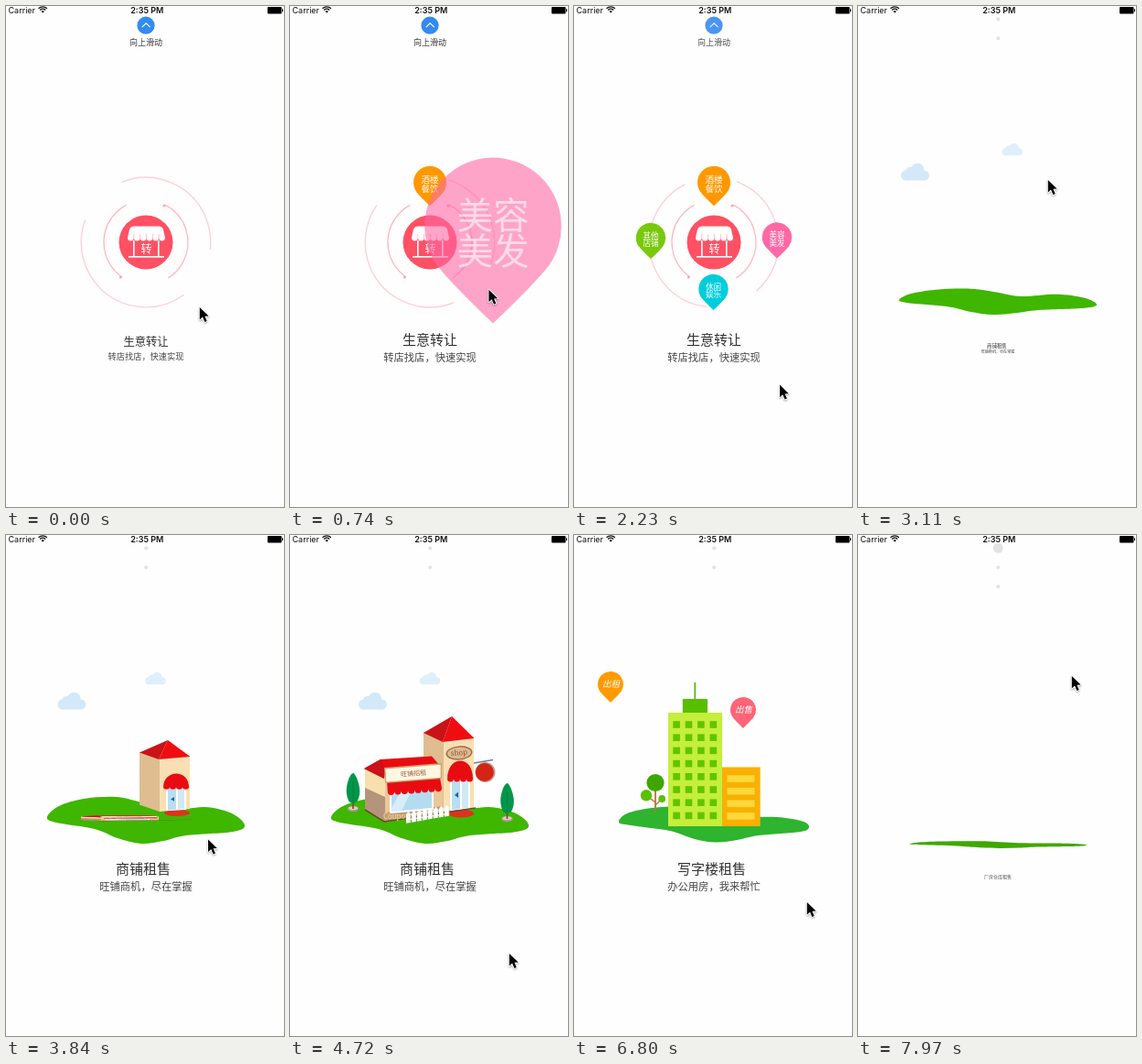
An HTML page with a canvas for the animation above (8 s loop, 304 by 547 pixels).

```html
<!DOCTYPE html>
<html lang="zh">
<head>
<meta charset="utf-8">
<title>Shop onboarding</title>
<style>
html, body { margin: 0; width: 100%; height: 100%; overflow: hidden; background: #fefefe; }
canvas { display: block; width: 304px; height: 547px; }
</style>
</head>
<body>
<canvas id="stage"></canvas>
<script>
const W = 304, H = 547, LOOP = 8000, STEP = 147.6;
const CJK = '"Noto Sans CJK SC", "Noto Sans CJK", sans-serif';
const cv = document.getElementById('stage');
const c = cv.getContext('2d');
const dpr = window.devicePixelRatio || 1;
cv.width = W * dpr;
cv.height = H * dpr;

const clamp = v => Math.max(0, Math.min(1, v));
const ramp = (n, start, len) => clamp((n - start) / len);
const backOut = p => 1 + 2.2 * (p - 1) ** 3 + 1.2 * (p - 1) ** 2;
const rad = d => d * Math.PI / 180;

function poly(color, ...p) {
  c.beginPath();
  for (let i = 0; i < p.length; i += 2) c.lineTo(p[i], p[i + 1]);
  c.closePath();
  c.fillStyle = color;
  c.fill();
}
function line(color, width, ...p) {
  c.beginPath();
  for (let i = 0; i < p.length; i += 2) c.lineTo(p[i], p[i + 1]);
  c.strokeStyle = color;
  c.lineWidth = width;
  c.stroke();
}
function oval(color, x, y, rx, ry = rx) {
  c.beginPath();
  c.ellipse(x, y, rx, ry, 0, 0, 7);
  c.fillStyle = color;
  c.fill();
}
function rect(color, x, y, w, h) {
  c.fillStyle = color;
  c.fillRect(x, y, w, h);
}
function arc(color, width, r, from, to) {
  c.beginPath();
  c.arc(153, 258, r, rad(from), rad(to));
  c.strokeStyle = color;
  c.lineWidth = width;
  c.stroke();
}
function text(str, x, y, size, color, weight = 400, font = CJK, align = 'center') {
  c.font = `${weight} ${size}px ${font}`;
  c.textAlign = align;
  c.textBaseline = 'alphabetic';
  c.fillStyle = color;
  c.fillText(str, x, y + size * 0.36);
}
// Closed smooth curve through the given points
function blob(color, p) {
  const k = p.length, at = i => p[(i + k) % k];
  c.beginPath();
  c.moveTo(...p[0]);
  for (let i = 0; i < k; i++) {
    const [a, b, d, e] = [at(i - 1), at(i), at(i + 1), at(i + 2)];
    c.bezierCurveTo(b[0] + (d[0] - a[0]) / 6, b[1] + (d[1] - a[1]) / 6,
      d[0] - (e[0] - b[0]) / 6, d[1] - (e[1] - b[1]) / 6, d[0], d[1]);
  }
  c.fillStyle = color;
  c.fill();
}
function scaled(x, y, sx, sy, draw) {
  if (sx <= 0 || sy <= 0) return;
  c.save();
  c.translate(x, y);
  c.scale(sx, sy);
  c.translate(-x, -y);
  draw();
  c.restore();
}
const grow = (n, start, len, x, y, draw) => {
  const s = backOut(ramp(n, start, len));
  if (n > start) scaled(x, y, s, s, draw);
};
const rise = (n, start, len, y, draw) => scaled(0, y, 1, ramp(n, start, len), draw);

function pin(x, y, r, color) {
  c.beginPath();
  c.arc(x, y, r, rad(145), rad(35));
  c.quadraticCurveTo(x + r * 0.6, y + r * 0.85, x, y + r * 1.42);
  c.quadraticCurveTo(x - r * 0.6, y + r * 0.85, x - r * 0.82, y + r * 0.57);
  c.fillStyle = color;
  c.fill();
}
function caption(s, title, sub, dx) {
  scaled(153, 374, s, s, () => {
    text(title, 153 + dx, 364.5, 15, '#333');
    text(sub, 153, 384, 11.25, '#444');
  });
}
const landScale = s => clamp(1 - Math.exp(-(s - 0.23) * 6.2));

const LAND_A = [[45, 308], [58, 296], [85, 288], [120, 286], [148, 292], [178, 301], [217, 297],
  [247, 304], [261, 317], [248, 324], [197, 328], [172, 334], [148, 337], [122, 331], [97, 321], [55, 314]];
const LAND_B = [[49, 313.5], [58, 304], [85, 298], [115, 296.5], [142, 297.5], [183, 307], [222, 308],
  [248, 312], [257, 318], [248, 324], [202, 328], [178, 333], [155, 335.5], [132, 332], [105, 323], [62, 317]];

// Category pins: x, y of the middle, final radius, moment of radius 106, colour, two lines
const PINS = [
  [153, 196.5, 18, 2.3, '#ff9800', '酒楼', '餐饮'],
  [222, 256, 16.2, 4.4, '#ff68a4', '美容', '美发'],
  [152.5, 312.5, 16.2, 6.56, '#00cddc', '休闲', '娱乐'],
  [84, 256.5, 16.2, 8, '#78c90c', '其他', '店铺']
];

function transferPage(n) {
  const turn = n * 2.85;
  arc('#ffd0d7', 1.4, 70.8, -112 + turn, 6.5 + turn);
  arc('#ffd0d7', 1.4, 70.8, 54 + turn, 200.5 + turn);
  arc('#ffb5c0', 1.2, 46, -63, 58);
  arc('#ffb5c0', 1.2, 46, 126, 242);
  oval('#ffa5b3', 173, 218, 1.6);
  oval('#ffa5b3', 125.5, 296, 1.6);

  oval('#ff5064', 153, 258, 29.5);
  c.beginPath();
  c.moveTo(140, 240.5);
  c.lineTo(167, 240.5);
  c.quadraticCurveTo(171, 240.5, 172, 244);
  c.lineTo(174, 253);
  for (let i = 0; i < 6; i++) c.arc(170.6 - i * 6.84, 253, 3.42, 0, Math.PI);
  c.lineTo(135, 244);
  c.quadraticCurveTo(136, 240.5, 140, 240.5);
  c.fillStyle = '#fff';
  c.fill();
  for (let i = 1; i < 6; i++) line('#ff9aa6', 0.6, 174 - i * 6.84, 249, 174 - i * 6.84, 256);
  rect('#fff', 139, 256, 1.6, 17.5);
  rect('#fff', 166, 256, 1.6, 17.5);
  rect('#fff', 134, 273, 39, 1.6);
  text('转', 153.5, 265.5, 12, '#fff', 500);

  caption(Math.min(1, 0.82 + n * 0.2), '生意转让', '转店找店，快速实现', 0);

  for (const [x, mid, end, at, color, a, b] of PINS) {
    const size = 106 - (n - at) * 52;
    if (size > 125) continue;
    const r = Math.max(end, size), y = mid - r * 0.21;
    c.save();
    c.globalAlpha *= clamp(1 - (r - 18) * 0.0072);
    pin(x, y, r, color);
    text(a, x, y - r * 0.15, r * 0.53, '#fff');
    text(b, x, y + r * 0.37, r * 0.53, '#fff');
    c.restore();
  }
}

function hint(n) {
  c.save();
  if (n > 11) c.globalAlpha *= 0.8 + 0.2 * Math.cos((n - 11) * 1.3);
  oval('#338af0', 153, 21.2, 9.6);
  line('#fff', 1.1, 148.7, 23.2, 153.2, 18.8, 157.7, 23.2);
  text('向上滑动', 153, 39.5, 9, '#333');
  c.restore();
}

function cloud(x, y, w, color) {
  scaled(x, y, w / 31, w / 31, () => {
    oval(color, x + 5.5, y + 13.5, 5.5);
    oval(color, x + 10, y + 9.5, 5.2);
    oval(color, x + 18, y + 7.5, 7.3);
    oval(color, x + 25.5, y + 13.5, 5.5);
    rect(color, x + 5.5, y + 9, 20, 10);
  });
}
function cypress(x, y) {
  oval('#a79482', x, y, 6.5, 3.2);
  oval('#d9cdbd', x, y - 0.8, 5, 2);
  rect('#7a4b28', x - 0.8, y - 12, 1.6, 12);
  blob('#00964a', [[x, y - 39], [x + 5, y - 31], [x + 7.3, y - 19], [x + 5, y - 9],
    [x, y - 6], [x - 5, y - 9], [x - 7.3, y - 20], [x - 5, y - 32]]);
  line('#087c40', 0.8, x, y - 30, x, y - 7);
}
function tower() {
  poly('#dfbd90', 146, 215, 168, 226, 168, 302, 146, 292);
  poly('#f8e0b2', 168, 226, 201, 222, 201, 298, 168, 302);
  poly('#c91318', 146, 216, 177, 198, 167, 226);
  poly('#f00d12', 177, 198, 201.5, 222, 167, 226);
  oval('#e03020', 187, 304, 14, 4.5);
  poly('#fff', 175, 267, 197, 266, 197, 299, 175, 301);
  poly('#b9def0', 177, 268, 186, 268, 186, 299, 177, 300);
  poly('#cfe9f5', 188, 268, 195, 268, 195, 298, 188, 299);
  poly('#1f6a94', 180, 284, 184, 280.5, 184, 287);
  c.beginPath();
  c.moveTo(172, 267);
  c.bezierCurveTo(172, 240, 200, 240, 200, 266);
  for (let i = 0; i < 4; i++) c.arc(196.5 - i * 7, 266, 3.5, 0, Math.PI);
  c.fillStyle = '#e90b12';
  c.fill();
}
function shopSigns() {
  c.save();
  c.translate(185, 238);
  c.rotate(-0.08);
  oval('#9c6c48', 0, 0, 14.5, 7.6);
  oval('#deb992', 0, 0, 13, 6.2);
  text('shop', 0, -0.5, 8, '#8a5838', 400, '"Noto Serif", serif');
  c.restore();
  line('#6d8494', 1.4, 201, 249, 222, 245.5);
  line('#6d8494', 0.8, 213, 247, 213, 251);
  oval('#b9a08c', 213.5, 259, 11);
  oval('#d42416', 212.8, 259, 10);
}
function store() {
  poly('#f8dfad', 82, 255, 104, 266, 104, 312, 82, 300);
  poly('#b4947a', 82, 276, 104, 286, 104, 312, 82, 300);
  poly('#e9c99a', 104, 262, 167, 256, 167, 303, 104, 312);
  poly('#c39c70', 104, 303, 167, 296, 167, 303, 104, 312);
  poly('#e90b12', 81, 255, 99, 245, 155, 241.5, 164, 252, 104, 258, 103, 266);
  poly('#c91318', 81, 255, 99, 245, 104, 258, 103, 266);
  poly('#fff', 109, 282, 157, 278, 157, 300, 109, 304);
  poly('#b3dcf1', 111, 283, 155, 279, 155, 298, 111, 302);
  poly('#d6eef9', 120, 282, 132, 281, 122, 301, 111, 302, 111, 298);
  line('#6b4a2c', 1.6, 82, 300, 103, 313, 203, 298);
  text('Coupon', 102, 307, 8, '#f6dda8', 400, '"Noto Serif", serif', 'left');
  c.beginPath();
  c.moveTo(106, 269);
  c.lineTo(164, 265);
  c.lineTo(166, 276);
  for (let i = 0; i < 8; i++) c.arc(162.3 - i * 7.4, 276.5 + i * 0.55, 3.7, 0, Math.PI);
  c.fillStyle = '#e90b12';
  c.fill();
  poly('#cfa26c', 103, 254, 166, 249, 166, 266, 104, 271);
  poly('#fff7e2', 104.5, 255.5, 164.7, 250.7, 164.7, 264.8, 105.3, 269.4);
  c.save();
  c.translate(135, 260.3);
  c.rotate(-0.07);
  text('旺铺招租', 0, 0, 7, '#94603c');
  c.restore();
}
function fence() {
  line('#eee', 1.6, 127, 306, 174, 299);
  line('#eee', 1.6, 127, 311, 174, 304);
  for (let i = 0; i < 8; i++) {
    const x = 127 + i * 6, y = 303 - i * 1.05;
    poly('#fff', x, y + 2, x + 2.4, y - 1, x + 4.8, y + 1.5, x + 4.8, y + 11, x, y + 11.8);
    line('#d5d5d5', 0.4, x + 5, y + 2, x + 5, y + 11);
  }
}
function shopPage(n) {
  const s = clamp((n - 19.2) / 5), drift = Math.max(0, n - 23);
  cloud(47 + drift * 3.1, 171.5, 31, '#d3e9fa');
  cloud(157.5 - drift * 1.75, 149.5, 22.5, '#dfeffc');
  scaled(0, 337, 1, landScale(s) / landScale(1), () => blob('#3fb600', LAND_A));
  rise(n, 24.2, 2.4, 302, tower);
  rise(n, 25.8, 2.4, 312, store);
  grow(n, 27.5, 2, 201, 248, shopSigns);
  grow(n, 28, 2, 69, 299, () => cypress(69, 299));
  grow(n, 28.6, 2, 237.5, 310, () => cypress(237.5, 310));
  rise(n, 29, 2, 314, fence);
  caption(s, '商铺租售', '旺铺商机，尽在掌握', -3);
}

function office() {
  rect('#58be00', 131.4, 161, 1.8, 19);
  rect('#58be00', 118.8, 179, 27.2, 16);
  rect('#c5ee3d', 103, 194, 59, 124);
  for (let row = 0; row < 8; row++)
    for (let col = 0; col < 4; col++)
      rect('#62c400', 108.3 + col * 13.4, 203.2 + row * 14.2, 7.6, 7.6);
}
function annex() {
  rect('#f9b000', 162, 253.5, 41.7, 64.5);
  for (let i = 0; i < 4; i++) rect('#ffd83b', 167.5, 262.3 + i * 13.6, 30, 7.6);
}
function roundTree() {
  line('#b5753c', 1.8, 89, 276, 89, 303);
  line('#b5753c', 1.5, 80, 285, 89, 292);
  line('#b5753c', 1.5, 96, 288, 89, 295);
  oval('#3fa600', 89, 270.5, 9.6);
  oval('#5ac000', 79, 284.3, 6.2);
  oval('#5ac000', 96.2, 288, 3.9);
}
function label(x, y, color, str) {
  pin(x, y, 14, color);
  text(str, x + 0.5, y, 9.5, '#fff', 'italic 400');
}
function officePage(n) {
  const s = clamp((n - 35.65) / 5);
  scaled(0, 336, 1, landScale(s) / landScale(1), () => blob('#2eb42e', LAND_B));
  rise(n, 40.1, 2.4, 318, office);
  rise(n, 41.4, 2, 318, annex);
  grow(n, 42.4, 2, 89, 303, roundTree);
  grow(n, 43, 2, 40, 183, () => label(40, 163, '#ff9a00', '出租'));
  grow(n, 43.8, 2, 185, 211, () => label(185, 191, '#ff6478', '出售'));
  caption(s, '写字楼租售', '办公用房，我来帮忙', -2.5);
}

function factoryPage(n) {
  const s = clamp((n - 52.7) / 5);
  scaled(153, 342, 0.93, landScale(s) * 1.15, () => {
    c.translate(0, 6);
    blob('#3fa800', LAND_B);
  });
  const k = s / 0.26;
  scaled(153, 373, k, k, () => text('厂房仓库租售', 153, 373, 5, '#555'));
}

// Page: painter, first step, start of exit, dots as [y, step at which it is small]
const PAGES = [
  [transferPage, -9, 17.6, []],
  [shopPage, 19.2, 33.4, [[14, 20], [35, 20.8]]],
  [officePage, 35.65, 49.6, [[14, 36.5], [35, 40]]],
  [factoryPage, 52.7, 99, [[14, 54.85], [35, 53.2], [56, 53.8]]]
];

function pages(n) {
  PAGES.forEach(([paint, from, exit, dots], i) => {
    const out = ramp(n, exit, 2);
    const shown = i ? PAGES[i - 1][2] : from;
    if (n >= shown && n < exit) {
      for (const [y, done] of dots) {
        const r = 2.1 + 4 * Math.max(0, done - n);
        if (r < 17) oval('#e3e3e3', 153.2, y + 0.3, r);
      }
    }
    if (n < from || out >= 1) return;
    c.save();
    c.globalAlpha = 1 - out;
    if (!i) hint(n);
    scaled(153, 270, 1 - out * 0.6, 1 - out * 0.6, () => paint(n));
    c.restore();
  });
}

function statusBar() {
  text('Carrier', 2.5, 5, 9, '#111', 400, 'Inter, sans-serif', 'left');
  text('2:35 PM', 154.3, 5, 9, '#111', 600, 'Inter, sans-serif');
  c.strokeStyle = '#111';
  c.lineWidth = 1.3;
  for (const r of [6.6, 4.2]) {
    c.beginPath();
    c.arc(40.2, 7.4, r, rad(-135), rad(-45));
    c.stroke();
  }
  c.beginPath();
  c.moveTo(40.2, 7.6);
  c.arc(40.2, 7.6, 2.4, rad(-135), rad(-45));
  c.fillStyle = '#111';
  c.fill();
  c.beginPath();
  c.roundRect(286, 1, 15.5, 7.4, 1);
  c.fillStyle = '#000';
  c.fill();
  rect('#000', 302, 3.3, 1, 2.8);
}

// Pointer path: step, x, y
const PATH = [[0, 211, 328], [8, 220, 297], [11, 225, 335], [16, 224, 432], [17.5, 222, 474],
  [21, 207, 189], [24, 214, 290], [32, 239, 456], [34, 242, 528], [36, 241, 400], [39, 239, 253],
  [43, 262, 345], [46, 254, 400], [48, 249, 424], [50, 248, 418], [54, 233, 153]];

function pointer(n) {
  let i = 1;
  while (i < PATH.length - 1 && PATH[i][0] < n) i++;
  const [a, x0, y0] = PATH[i - 1], [b, x1, y1] = PATH[i];
  const p = ramp(n, a, b - a);
  c.save();
  c.translate(x0 + (x1 - x0) * p, y0 + (y1 - y0) * p);
  const shape = [0.8, 1, 0.8, 14.6, 4, 11.6, 6.4, 17, 8.7, 16, 6.4, 10.8, 10.6, 10.6];
  c.shadowColor = 'rgba(0,0,0,.35)';
  c.shadowBlur = 2 * dpr;
  c.shadowOffsetY = dpr;
  c.lineJoin = 'round';
  line('#fff', 1.8, ...shape, 0.8, 1);
  c.shadowColor = 'transparent';
  poly('#000', ...shape);
  c.restore();
}

function frame(now) {
  const n = Math.floor((now % LOOP + 5) / STEP);
  c.setTransform(dpr, 0, 0, dpr, 0, 0);
  rect('#fefefe', 0, 0, W, H);
  pages(n);
  statusBar();
  pointer(n);
}

const start = performance.now();
function tick() {
  frame(performance.now() - start);
  requestAnimationFrame(tick);
}
tick();
</script>
</body>
</html>
```
